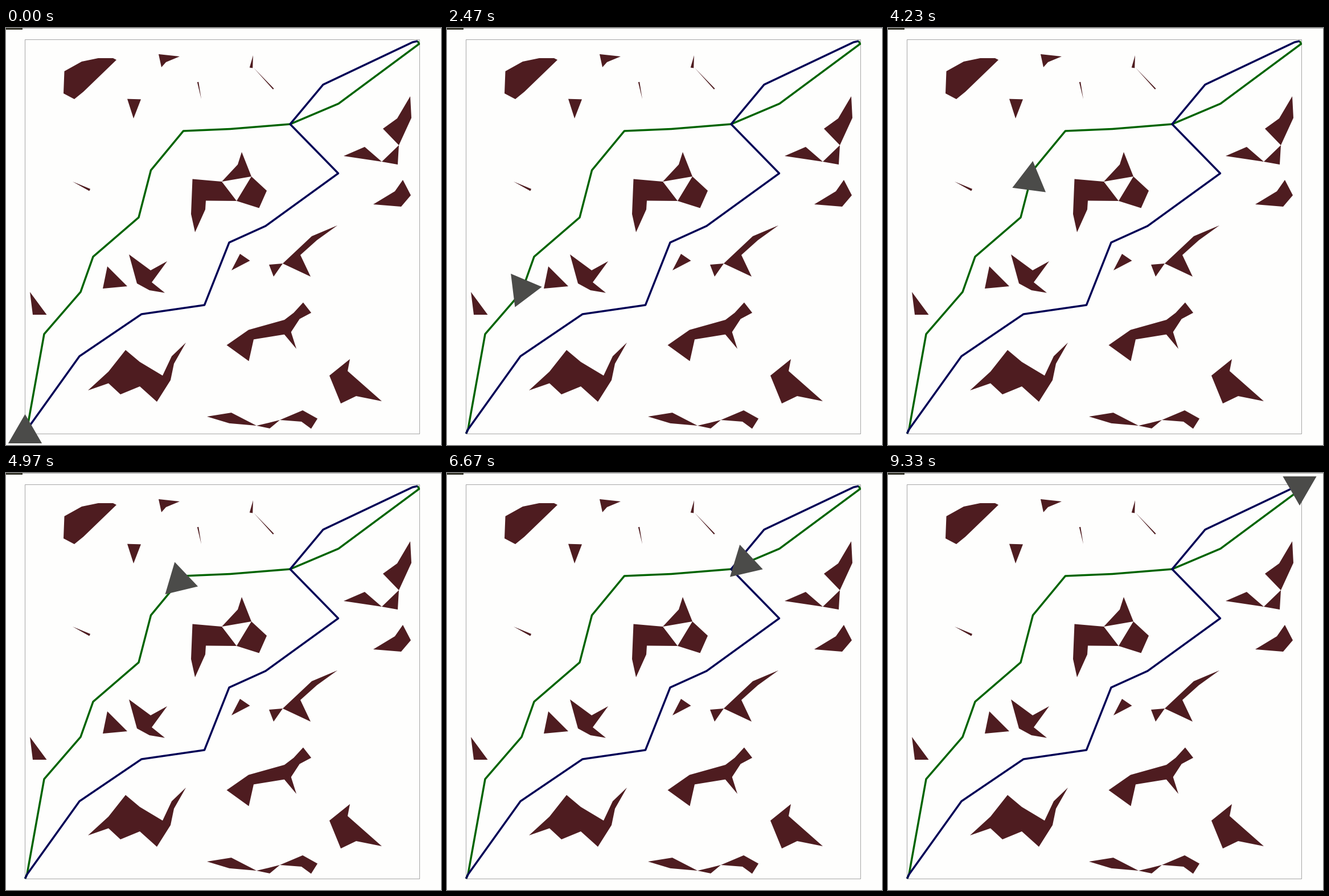
A matplotlib script that plays this animation: 764x733 px, repeating every 9910 ms.

```python
import numpy as np
import matplotlib.pyplot as plt
from matplotlib.animation import FuncAnimation
from matplotlib.patches import Polygon, Rectangle

W, H, DPI = 764, 733, 100
PX = 72 / DPI  # points per pixel
LOOP, FRAMES, FPS = 9910, 298, 30

PAPER, MAROON, GRAPHITE = "#fefefd", "#4e1c20", "#4b4b49"
GREEN, NAVY, BORDER = "#006400", "#000056", "#a6a6a6"

START, SPEED = 325, 0.1328  # ms, pixels per ms
TURN_COST = 0.45            # pixels per degree of rotation
RADIUS = 34.2

fig = plt.figure(figsize=(W / DPI, H / DPI), dpi=DPI, facecolor=PAPER)
ax = fig.add_axes([0, 0, 1, 1])
ax.set_xlim(0, W)
ax.set_ylim(H, 0)
ax.axis("off")


def shape(*points, color=MAROON):
    ax.add_patch(Polygon(points, facecolor=color, lw=0, zorder=2))


def ribbon(*spine):
    """Band of varying width along a spine of (x, y, width)."""
    spine = np.array(spine, float)
    mid = spine[:, :2]
    along = np.gradient(mid, axis=0)
    along /= np.linalg.norm(along, axis=1, keepdims=True)
    side = along[:, ::-1] * [-1, 1] * spine[:, 2:] / 2
    shape(*(mid + side), *(mid - side)[::-1])


def spike(x, y, width, tip_x, tip_y):
    ribbon((x, y, width), (tip_x, tip_y, 0))


def route(points, color, z):
    ax.plot(*np.transpose(points), color=color, lw=3.5 * PX, zorder=z,
            solid_joinstyle="round", solid_capstyle="butt")


def lengths(*coords):
    """Distance travelled at each waypoint."""
    steps = np.linalg.norm(np.diff(coords, axis=1), axis=0)
    return np.concatenate([[0], np.cumsum(steps)])


# Window edge and workspace
ax.add_patch(Rectangle((0, 0), W, 1, facecolor="#a9a9a7", lw=0))
ax.add_patch(Rectangle((0, 0), 29, 3, facecolor="#35352b", lw=0))
ax.add_patch(Rectangle((33.5, 20.5), 693, 693, fill=False, snap=False,
                       edgecolor=BORDER, lw=PX, zorder=1))

# Slivers
spike(225, 125, 24, 224, 159)
spike(337, 95, 2.4, 343, 125)
spike(430.5, 70, 5.5, 434, 48)
spike(469.7, 107.2, 2.2, 435, 70)
spike(147.2, 284.7, 4, 117, 270)

# Small blocks
shape((268, 46), (305, 50), (281, 60), (273, 69))
shape((411, 397), (428.5, 409), (396, 426))
shape((178, 419), (213, 454), (170, 458))
shape((42, 464), (71.5, 504), (47, 504))
shape((697, 267), (711, 294), (694, 314), (645, 310), (683, 287))
shape((604, 582), (600, 603), (660, 656), (615, 647),
      (588, 660), (568, 611))
shape((102.5, 76), (133, 59), (162, 53), (188, 53), (194, 56),
      (136, 112), (120, 125), (101, 115))
shape((216, 398), (254, 426), (283, 410), (256, 447),
      (279, 465.5), (252, 461), (230, 449))

# Hinged blocks
shape((327.5, 265.5), (379, 270), (407, 240), (414, 218), (431, 261),
      (458, 286), (444.5, 316.5), (405, 304), (351, 303.5),
      (350, 319), (332, 359), (325, 327))
shape((379, 270), (431, 261), (405, 304), color=PAPER)
shape((710, 120), (712, 158), (690, 206), (688, 240), (660, 235),
      (593, 225), (630, 209), (660, 235), (690, 206), (662, 177),
      (687, 159))
shape((582, 347), (546, 373), (517, 399), (535, 437), (486, 414),
      (470, 437), (462, 416), (486, 414), (537, 366))

# Long blocks
shape((316, 553), (295, 590), (289, 619), (265, 657), (235, 630),
      (201, 644), (180, 624.5), (144, 637), (180, 604), (210, 566),
      (235, 587), (275, 611), (291, 577))
ribbon((407, 571.5, 48), (430.5, 539, 19), (494, 525, 26),
       (510.5, 506, 15), (529, 491.5, 23))
spike(493, 533, 14, 510, 564)
ribbon((353, 683, 0), (394, 685.5, 19), (440, 699, 0), (462, 699, 10),
       (481, 689, 0), (520, 682, 20), (541.5, 695.5, 21))

# Two routes from corner to corner
green = [(33.5, 713), (37, 705), (67, 538), (131, 464), (153, 402),
         (233, 333), (254.5, 250), (311.5, 181), (394, 177.5), (499, 169),
         (584, 133), (725.5, 28), (723, 23)]
navy = [(33.5, 713), (37, 705.5), (129, 577), (238, 503), (348.5, 487),
        (392, 377), (456, 348), (583.5, 255.5), (499, 169), (557, 99.5),
        (714, 25), (723, 23)]
route(green, GREEN, 3)
route(navy, NAVY, 4)

# The robot swings between a few headings, at even speed in pose space
xs, ys = np.transpose(green)
path = lengths(xs, ys)
turns = [0, 2, 3, 6, 8, 10, 11, 12]
headings = np.interp(path, path[turns],
                     [90, 74.5, 128, 79, 133, 87.6, 120, 150])
pose = lengths(xs, ys, TURN_COST * headings)

robot = Polygon(np.zeros((3, 2)), facecolor=GRAPHITE, lw=0, zorder=5)
ax.add_patch(robot)


def draw(i):
    gone = SPEED * (i * 1000 / FPS - START)
    x, y, heading = (np.interp(gone, pose, v) for v in (xs, ys, headings))
    a = np.radians(heading + np.array([0, 120, 240]))
    robot.set_xy(np.column_stack([x + RADIUS * np.cos(a),
                                  y - RADIUS * np.sin(a)]))
    return robot,


anim = FuncAnimation(fig, draw, frames=FRAMES, interval=LOOP / FRAMES,
                     repeat=True, repeat_delay=0, blit=True)
plt.show()
```
